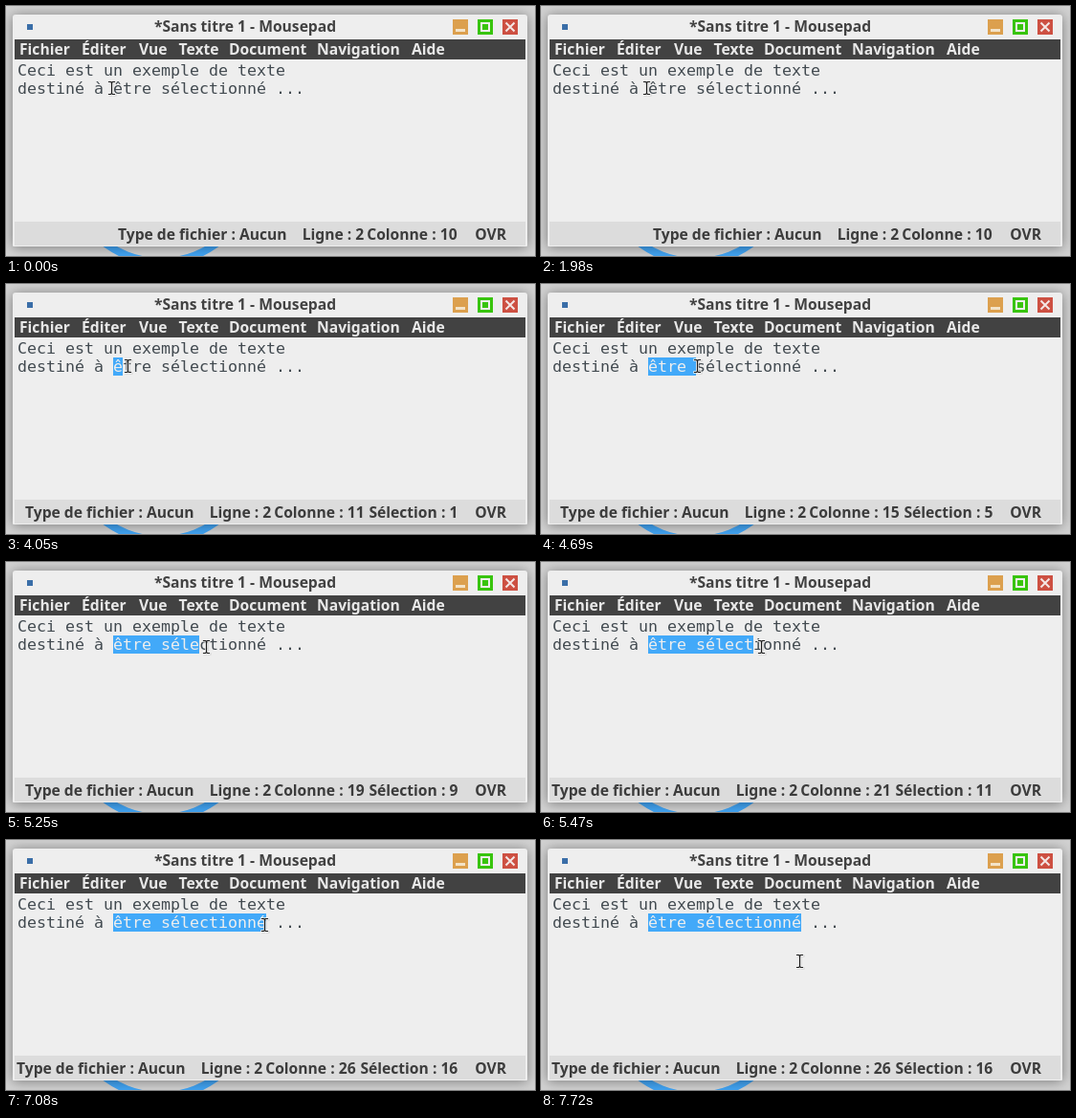
These frames come from a looping animation (553 px wide and 262 px high, 9630 ms). An HTML page with a canvas:

```html
<!DOCTYPE html>
<html lang="fr">
<head>
<meta charset="utf-8">
<title>Sélection de texte</title>
<style>
  html, body { margin: 0; width: 100%; height: 100%; overflow: hidden; background: #d2d2d2; }
  canvas { display: block; }
</style>
</head>
<body>
<canvas id="stage" width="553" height="262"></canvas>
<script>
const ctx = document.getElementById('stage').getContext('2d');
const LOOP = 9630;
const UI_FONT = 'bold 15.65px "Noto Sans", "Open Sans", sans-serif';
const MONO_FONT = '16.61px "DejaVu Sans Mono", monospace';
const CHAR = 10, TEXT_X = 12, ANCHOR = 112, LINE_TOP = 77, LINE_H = 19;
const LINES = ['Ceci est un exemple de texte', 'destiné à être sélectionné ...'];
const MENU = [['Fichier', 14], ['Éditer', 79], ['Vue', 139], ['Texte', 180.5],
              ['Document', 233], ['Navigation', 325], ['Aide', 424]];
const CARET_TOGGLES = [40, 790, 1170, 1980, 2380, 3170, 3570];

// Pointer path: time, x, y
const PATH = [[3570, 110, 86], [3700, 111, 86], [3870, 112, 86], [4050, 127, 86],
              [4690, 163, 86], [5250, 209, 89], [5820, 263, 89], [6030, 270, 89],
              [7080, 270, 89], [7720, 270, 127]];

function pointerAt(t) {
  if (t <= PATH[0][0]) return PATH[0].slice(1);
  for (let i = 1; i < PATH.length; i++) {
    const [t0, x0, y0] = PATH[i - 1], [t1, x1, y1] = PATH[i];
    if (t >= t1) continue;
    let k = (t - t0) / (t1 - t0);
    if (t0 === 7080) k = k * k * (3 - 2 * k);
    return [x0 + (x1 - x0) * k, y0 + (y1 - y0) * k].map(Math.round);
  }
  return PATH[PATH.length - 1].slice(1);
}

// The selection follows the pointer with a small delay.
function selectedAt(t) {
  const n = Math.round((pointerAt(t - 50)[0] - ANCHOR) / CHAR);
  return Math.max(0, Math.min(16, n));
}

function rect(color, x, y, w, h) {
  ctx.fillStyle = color;
  ctx.fillRect(x, y, w, h);
}

function label(text, x, y, color, font = UI_FONT) {
  ctx.font = font;
  ctx.fillStyle = color;
  ctx.fillText(text, x, y);
}

function windowShape() {
  ctx.beginPath();
  ctx.roundRect(7, 9, 538, 243, [3, 3, 1, 1]);
}

function drawDesktop() {
  rect('#d2d2d2', 0, 0, 553, 262);
  ctx.strokeStyle = '#42a5f5';
  ctx.lineWidth = 8;
  ctx.beginPath();
  ctx.arc(162, 170, 98, 0, Math.PI * 2);
  ctx.stroke();
}

function drawButtons() {
  rect('#dca04e', 467, 14, 16, 16);
  rect('#f3e3c8', 470, 24, 10, 3);

  rect('#38c40c', 493, 14, 16, 16);
  rect('#eeeeee', 496, 17, 10, 10);
  rect('#38c40c', 498, 19, 6, 6);

  rect('#cd5042', 519, 14, 16, 16);
  ctx.strokeStyle = '#f4e6e4';
  ctx.lineWidth = 2;
  ctx.beginPath();
  ctx.moveTo(522.5, 17.5); ctx.lineTo(531.5, 26.5);
  ctx.moveTo(531.5, 17.5); ctx.lineTo(522.5, 26.5);
  ctx.stroke();
}

function drawWindow() {
  ctx.save();
  ctx.shadowColor = 'rgba(0,0,0,.42)';
  ctx.shadowBlur = 13;
  ctx.shadowOffsetY = 1;
  ctx.fillStyle = '#eeeeee';
  windowShape();
  ctx.fill();
  ctx.restore();

  rect('#3a6ea8', 22, 19, 6, 6);
  ctx.textAlign = 'center';
  label('*Sans titre 1 - Mousepad', 250, 27, '#424242');
  ctx.textAlign = 'left';
  drawButtons();

  rect('#424242', 9, 35, 534, 21);
  for (const [name, x] of MENU) label(name, x, 51, '#e8e8e8');
  rect('#dcdcdc', 9, 226, 534, 25);
}

function drawStatus(n) {
  const color = '#3c3c3c';
  const [typeX, lineX] = n === 0 ? [117, 309.7] : n < 10 ? [20, 212.7] : [11, 203.7];
  label('Type de fichier : Aucun', typeX, 245, color);
  label('Ligne : 2', lineX, 245, color);
  label('Colonne : ' + (10 + n), lineX + 67.5, 245, color);
  if (n) label('Sélection : ' + n, lineX + 166.7, 245, color);
  label('OVR', 490.3, 245, color);
}

function drawText(n, caret) {
  LINES.forEach((line, i) => label(line, TEXT_X, 73 + LINE_H * i, '#424a50', MONO_FONT));
  if (n) {
    ctx.save();
    ctx.beginPath();
    ctx.rect(ANCHOR, LINE_TOP, n * CHAR, LINE_H);
    ctx.clip();
    rect('#42a9f9', ANCHOR, LINE_TOP, n * CHAR, LINE_H);
    label(LINES[1], TEXT_X, 92, '#eeeeee', MONO_FONT);
    ctx.restore();
  } else if (caret) {
    rect('#424242', ANCHOR, LINE_TOP, 1, LINE_H);
  }
}

function beam(x, y) {
  ctx.beginPath();
  ctx.moveTo(x - 3, y - 6.5);
  ctx.lineTo(x - 1, y - 6.5);
  ctx.lineTo(x, y - 5.5);
  ctx.lineTo(x + 1, y - 6.5);
  ctx.lineTo(x + 3, y - 6.5);
  ctx.moveTo(x, y - 5.5);
  ctx.lineTo(x, y + 5.5);
  ctx.moveTo(x - 3, y + 6.5);
  ctx.lineTo(x - 1, y + 6.5);
  ctx.lineTo(x, y + 5.5);
  ctx.lineTo(x + 1, y + 6.5);
  ctx.lineTo(x + 3, y + 6.5);
}

function drawPointer([x, y]) {
  ctx.lineCap = 'square';
  for (const [color, width, shift] of [['rgba(0,0,0,.14)', 2, 1], ['#f6f6f6', 2.6, 0], ['#1c1c1c', 1.2, 0]]) {
    ctx.strokeStyle = color;
    ctx.lineWidth = width;
    beam(x + 0.5 + shift, y + shift);
    ctx.stroke();
  }
  ctx.lineCap = 'butt';
}

function draw(now) {
  const t = now % LOOP;
  const n = selectedAt(t);
  const caret = CARET_TOGGLES.filter(time => t >= time).length % 2 === 1;
  drawDesktop();
  drawWindow();
  drawText(n, caret);
  drawStatus(n);
  drawPointer(pointerAt(t));
}

const start = performance.now();
function frame() {
  draw(performance.now() - start);
  requestAnimationFrame(frame);
}
frame();
</script>
</body>
</html>
```
